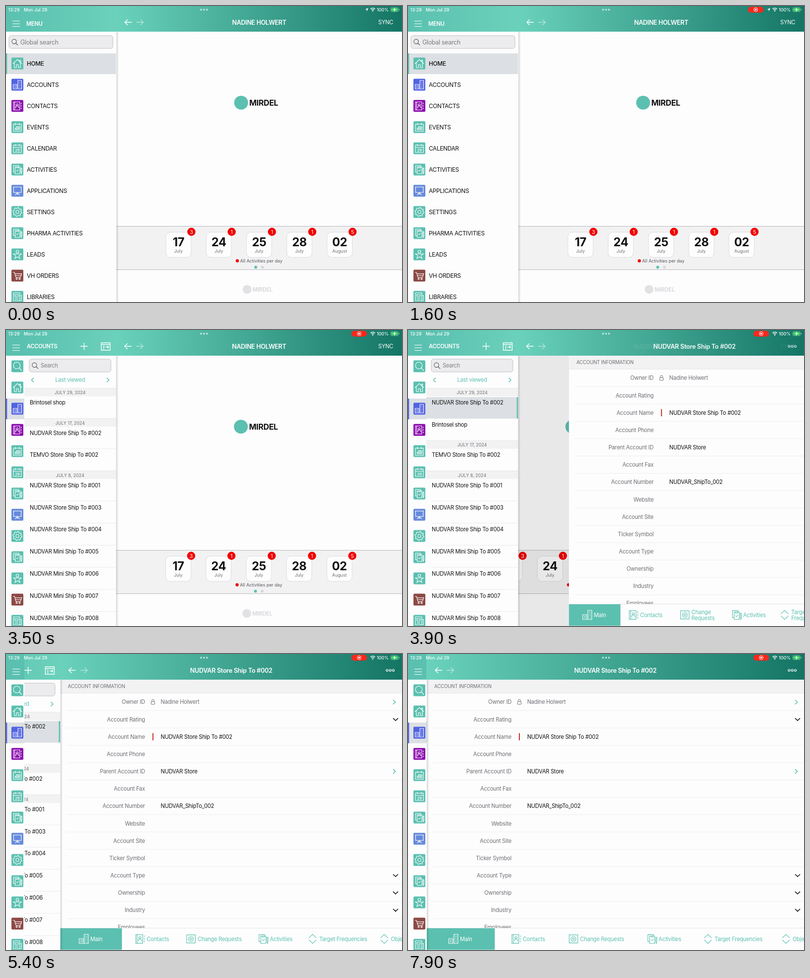
These frames come from a looping animation (800 px wide and 600 px high, 8 s). An HTML page:

```html
<!DOCTYPE html>
<html lang="en">
<head>
<meta charset="utf-8">
<title>Account browser</title>
<style>
html, body { margin: 0; width: 100%; height: 100%; overflow: hidden; background: #fdfdfe; }
svg { display: block; width: 800px; height: 600px; font-family: Inter, Roboto, sans-serif; }
text { white-space: pre; }
</style>
</head>
<body>
<svg id="stage" viewBox="0 0 800 600">
  <defs>
    <linearGradient id="side"><stop stop-color="#5bc1b0"/><stop offset="1" stop-color="#6bd1bb"/></linearGradient>
    <linearGradient id="bar"><stop stop-color="#6ad2bc"/><stop offset="1" stop-color="#147565"/></linearGradient>
    <linearGradient id="shade"><stop stop-color="#000" stop-opacity=".16"/><stop offset="1" stop-color="#000" stop-opacity="0"/></linearGradient>
  </defs>
  <g id="scene"></g>
</svg>
<script>
const LOOP = 8000, TEAL = '#5bc0b0', PAPER = '#fdfdfe', BAND = '#f2f2f3', PICKED = '#dcdfe3', GREY = '#6f6f74';
const STRIP = 38, SIDE = 223;

const clamp = v => Math.max(0, Math.min(1, v));
const ease = v => { v = clamp(v); return v * v * (3 - 2 * v); };
const rect = (x, y, w, h, fill, extra = '') =>
  `<rect x="${x}" y="${y}" width="${w}" height="${h}" fill="${fill}" ${extra}/>`;
const dot = (x, y, r, fill, extra = '') => `<circle cx="${x}" cy="${y}" r="${r}" fill="${fill}" ${extra}/>`;
const line = (d, color, width = 1.2, extra = '') =>
  `<path d="${d}" fill="none" stroke="${color}" stroke-width="${width}" ${extra}/>`;
const move = (x, y, body, extra = '') => `<g transform="translate(${x} ${y})" ${extra}>${body}</g>`;
// y is the vertical middle of the capitals
function text(x, y, s, { size = 11.1, fill = '#111', weight = 400, anchor = 'start', track = -.02, opacity = 1 } = {}) {
  return `<text x="${x}" y="${y + size * .36}" font-size="${size}" font-weight="${weight}" fill="${fill}"
    text-anchor="${anchor}" letter-spacing="${track * size}" opacity="${opacity}">${s}</text>`;
}

const gear = (outer, inner) => 'M' + Array.from({ length: 32 }, (_, i) => {
  const r = i % 4 < 2 ? outer : inner, a = (i + .5) * Math.PI / 16;
  return `${(12 + r * Math.cos(a)).toFixed(2)} ${(12 + r * Math.sin(a)).toFixed(2)}`;
}).join('L') + 'z';
const ring = (x, y, r) => `M${x - r} ${y}a${r} ${r} 0 1 0 ${2 * r} 0a${r} ${r} 0 1 0 ${-2 * r} 0`;

// Line icons on a 24 unit square
const ICONS = {
  search: ring(10.8, 10.5, 6.8) + 'M15.7 15.5L21 21',
  home: 'M3 12.5L12 4L21 12.5M5.8 10.5V20.5H10V14.5H14V20.5H18.2V10.5M16.3 8V5.2H18.5V10',
  accounts: 'M3.5 11.5H11V20.5H3.5zM13 3.5H20.5V20.5H13zM5.5 14.5h3.6M5.5 17.5h3.6M15 7h1.2M17.4 7h1.2M15 10.5h1.2M17.4 10.5h1.2M15 14h1.2M17.4 14h1.2M15 17.5h1.2M17.4 17.5h1.2',
  contacts: 'M4 4H16.8V20.2H4zM6.5 4V20.2' + ring(11.7, 9.8, 2) + 'M8.7 16.5V15a3 3 0 0 1 6 0V16.5M19.8 5.5v3M19.8 10.5v3M19.8 15.5v3',
  events: 'M4 6H20V20.5H4zM8 3.5v4.5M16 3.5v4.5M7.5 17.5h9.5V11H10V17.5M7.5 17.5V14.2H17M13.5 11V17.5',
  calendar: 'M4 5.5H20V20.5H4zM4 10H20M8 3.5v4M16 3.5v4',
  activities: 'M7.5 6.5H17V20.5H7.5zM7.5 17H4.2V3.8H14.5V6.5M10 6.5v2h4.5v-2M10 13.5l1.8 1.8 3-3.3M19 9h2v9l-1 2.5-1-2.5z',
  applications: 'M3 4.5H21M4.3 4.5V15.5H19.7V4.5M12 15.5V20.5M12 16L7.5 20.5M12 16L16.5 20.5',
  settings: gear(9.2, 7.2) + ring(12, 12, 3.2),
  leads: ring(12, 6.5, 2.7) + 'M4 11h16l-4.7 3.6 1.8 5.7L12 17l-5.1 3.3 1.8-5.7z',
  orders: 'M3 5.5H6.2L9 15.5H18L20.8 8H7' + ring(10.5, 18.5, 1.4) + ring(16.5, 18.5, 1.4) + 'M8 11.5H19',
  libraries: 'M4 4H16.8V20H4zM16.8 9H20V20H16.8M6.8 7.5h7v3.5h-7zM6.8 14h7M6.8 17h7',
  change: 'M4 4.5H20V19.5H4zM6.5 7v.1M17.5 7v.1M6.5 17v.1M17.5 17v.1' + ring(12, 12, 1.8) + ring(12, 12, 4.6),
  sort: 'M5 10.2L12 3.5L19 10.2M5 13.8L12 20.5L19 13.8'
};
const icon = (name, x, y, size, color) =>
  `<g transform="translate(${x} ${y}) scale(${size / 24})">${line(ICONS[name], color, 1.1 * 24 / size)}</g>`;
const tile = (name, y, color) => rect(11, y - 12, 24, 24, color, 'rx="2"') + icon(name, 11, y - 12, 24, '#fff') +
  (name === 'calendar' ? text(23, y + 3.4, '29', { size: 8, fill: '#fff', weight: 500, anchor: 'middle' }) : '');

const MENU = [
  ['HOME', 'home', TEAL], ['ACCOUNTS', 'accounts', '#5063e2'], ['CONTACTS', 'contacts', '#8b0cae'],
  ['EVENTS', 'events', TEAL], ['CALENDAR', 'calendar', TEAL], ['ACTIVITIES', 'activities', TEAL],
  ['APPLICATIONS', 'applications', '#668adb'], ['SETTINGS', 'settings', TEAL],
  ['PHARMA ACTIVITIES', 'activities', TEAL], ['LEADS', 'leads', TEAL],
  ['VH ORDERS', 'orders', '#8c4945'], ['LIBRARIES', 'libraries', TEAL]
];
const rowY = i => 116.5 + 43 * i;
const pickedRow = (i, w) => rect(0, rowY(i) - 20.5, w, 42, PICKED) + rect(0, rowY(i) - 20.5, 2.2, 42, MENU[i][2]);
const hamburger = line('M13 30.5H28M13 36H28M13 41.5H28', '#fff', 1.1);
const tiles = MENU.map(([, name, color], i) => tile(name, rowY(i), color)).join('');

function searchField(x, y, w, label, size) {
  return rect(x, y, w, 26, '#ececee', 'rx="4.5" stroke="#c0c0c4"') +
    line(ring(x + 10.5, y + 12, 4.6) + `M${x + 14} ${y + 15.5}l4 4`, '#55555a', 1.1) +
    text(x + 23, y + 13, label, { size, fill: '#7d7d83', track: -.03 });
}

function menu(picked) {
  return rect(0, 0, SIDE, 600, PAPER) + rect(0, 0, SIDE, 52, 'url(#side)') + pickedRow(picked, 222) +
    text(41, 36, 'MENU', { fill: '#fff', weight: 600 }) +
    MENU.map(([label], i) => text(42, rowY(i), label,
      { size: 11.85, track: -.028, weight: i === picked ? 500 : 400 })).join('');
}

const SHOP = 'Brintosel shop', NAMED = 'NUDVAR Store Ship To #002', SECOND = 'TEMVO Store Ship To #002';
const JULY_8 = ['Store Ship To #001', 'Store Ship To #003', 'Store Ship To #004', 'Mini Ship To #005',
  'Mini Ship To #006', 'Mini Ship To #007', 'Mini Ship To #008'].map(s => 'NUDVAR ' + s);

function panel(reordered, highlight) {
  const sections = [
    ['JULY 29, 2024', reordered ? [NAMED, SHOP] : [SHOP]],
    ['JULY 17, 2024', reordered ? [SECOND] : [NAMED, SECOND]],
    ['JULY 8, 2024', JULY_8]
  ];
  let y = 118;
  let out = rect(37, 0, 186, 600, PAPER) + rect(37, 0, 186, 52, 'url(#side)') +
    text(42, 33.5, 'ACCOUNTS', { fill: '#fff', weight: 600 }) +
    line('M150.5 33H165M157.7 26V40.5', '#fff', 1.4) +
    line('M192.5 26H210.5V41H192.5zM192.5 29.5H210.5M197.5 31.5V39M201 34.5H207.5M205 32L207.5 34.5L205 37', '#fff', 1.4) +
    searchField(47, 59, 165, 'Search', 11.1) +
    line('M56 97L51.5 101.5L56 106M203.5 97L208 101.5L203.5 106', TEAL, 1.5) +
    text(129.5, 101, 'Last viewed', { fill: TEAL, anchor: 'middle' });
  for (const [date, names] of sections) {
    out += rect(37, y, 186, 16.5, BAND) + line(`M37 ${y}H223`, '#e4e4e6', .8) +
      text(129.5, y + 9, date, { size: 8.9, fill: GREY, anchor: 'middle', track: 0 });
    y += 16.5;
    names.forEach((name, i) => {
      if (highlight && name === NAMED) out += rect(37, y + 1.5, 186, 43.5, PICKED) + rect(219.7, y + 1.5, 2.6, 43.5, TEAL);
      out += text(48, y + 12.9, name);
      y += 44.8;
      if (i < names.length - 1) out += line(`M48 ${y}H223`, '#e6e6e8', .8);
    });
  }
  return out;
}

const CARDS = [['17', 'July', 3], ['24', 'July', 1], ['25', 'July', 1], ['28', 'July', 1], ['02', 'August', 5]];
const home = rect(0, 52, 1000, 548, PAPER) +
  dot(475, 196, 14, TEAL) + text(491.5, 196, 'MIRDEL', { size: 16, weight: 700 }) +
  rect(0, 446, 1000, 89, BAND) + line('M0 446.5H1000M0 534.5H1000', '#b9b9bc', 1) +
  CARDS.map(([day, month, count], i) => {
    const x = 348.5 + 81.4 * i;
    return rect(x - 25.5, 458.5, 51, 51, PAPER, 'rx="9" stroke="#dcdce0"') +
      text(x, 478.5, day, { size: 23.7, weight: 700, anchor: 'middle' }) +
      text(x, 497, month, { size: 8.9, fill: GREY, anchor: 'middle', track: 0 }) +
      dot(x + 26, 457.7, 8.2, '#f00000') +
      text(x + 26, 457.7, count, { size: 10.8, fill: '#fff', anchor: 'middle' });
  }).join('') +
  dot(467.3, 516.5, 3.2, '#f00000') + text(473, 516.5, 'All Activities per day', { size: 8.9, fill: '#58585c', track: 0 }) +
  dot(504.5, 529.5, 2.9, TEAL) + dot(518, 529.5, 2.9, '#d6d6d9') +
  dot(487, 574.5, 9, '#e2e2e5') + text(498, 574.5, 'MIRDEL', { size: 11.2, weight: 700, fill: '#dadadd' });

// label, value, control at the right
const FIELDS = [
  ['Owner ID', 'Nadine Holwert', 'go'], ['Account Rating', '', 'drop'], ['Account Name', NAMED],
  ['Account Phone'], ['Parent Account ID', 'NUDVAR Store', 'go'], ['Account Fax'],
  ['Account Number', 'NUDVAR_ShipTo_002'], ['Website'], ['Account Site'], ['Ticker Symbol'],
  ['Account Type', '', 'drop'], ['Ownership', '', 'drop'], ['Industry', '', 'drop'], ['Employees']
];
// label, icon, content width on one line, content width on two lines
const TABS = [
  ['Main', 'accounts', 48], ['Contacts', 'contacts', 69], ['Change Requests', 'change', 112, 70],
  ['Activities', 'activities', 69], ['Target Frequencies', 'sort', 118, 83], ['Objectives', 'sort', 77]
];

function tabBar(left) {
  const width = (800 - left) / 5.55, narrow = width < 122;
  return rect(left, 555, 800, 45, PAPER) + line(`M${left} 555.5H1400`, '#e2e2e4', 1) +
    TABS.map(([label, name, wide, slim], i) => {
      const color = i ? TEAL : '#fff', wraps = narrow && slim;
      const x = left + width * (i + .5) - (wraps ? slim : wide) / 2, tx = x + 22.3;
      const lines = wraps ? label.split(' ') : [label];
      return (i ? '' : rect(left, 556, width, 43.5, TEAL)) + icon(name, x - 4, 564.5, 26, color) +
        lines.map((s, k) => text(tx, 578 + (k - (lines.length - 1) / 2) * 12.6, s, { fill: color })).join('');
    }).join('');
}

function detail(left) {
  const rows = FIELDS.map(([label, value, control], i) => {
    const y = 97.5 + 35.15 * i;
    return text(left + 171, y, label, { fill: GREY, anchor: 'end' }) +
      (value ? text(left + 202.7, y, value, { fill: i ? '#111' : GREY }) : '') +
      line(`M${left + 12} ${y + 17.3}H${1400}`, '#ececee', .9) +
      (control === 'go' ? line(`M782 ${y - 4.5}l4.6 4.5l-4.6 4.5`, TEAL, 1.5) : '') +
      (control === 'drop' ? line(`M782 ${y - 2.5}l5 4.8l5 -4.8`, '#111', 1.5) : '');
  }).join('');
  const x = left + 187;
  return rect(left, 52, 800, 548, PAPER) + rect(left, 52, 800, 27, BAND) + line(`M${left} 79.3H1400`, '#e2e2e4', .9) +
    text(left + 15, 66, 'ACCOUNT INFORMATION', { size: 9.63, fill: GREY, track: -.012 }) + rows +
    rect(x - 3.7, 96.5, 7.4, 5.5, 'none', `rx="1" stroke="${GREY}"`) +
    line(`M${x - 2.3} 96.5v-2a2.3 2.3 0 0 1 4.6 0v2`, GREY, 1) +
    rect(x - 1, 160.5, 2, 14.5, '#c92f2f') + tabBar(left);
}

function header(left, push) {
  const middle = (left + 800) / 2, title = { size: 12.6, fill: '#fff', weight: 600, anchor: 'middle' };
  const leaving = (1 - push) ** 1.4;
  return rect(left, 0, 800 - left, 52, 'url(#bar)') +
    line(`M${left + 31} 33H${left + 17}M${left + 23} 27.3L${left + 17} 33L${left + 23} 38.7`, '#fff', 1.4) +
    line(`M${left + 40} 33H${left + 54}M${left + 48.5} 27.3L${left + 54.5} 33L${left + 48.5} 38.7`, '#fff', 1.4, 'opacity=".5"') +
    text(middle, 33.5, 'NADINE HOLWERT', { ...title, track: -.03, opacity: leaving }) +
    text(752, 33.5, 'SYNC', { fill: '#fff', opacity: leaving }) +
    (push ? text(middle + 380 * (1 - push), 33.5, NAMED, { ...title, opacity: clamp(push * 1.15) }) +
      [770, 776.3, 782.5].map(x => dot(x, 33, 2, 'none', `stroke="#fff" stroke-width="1.2" opacity="${push}"`)).join('') : '');
}

function statusBar(recording, locating) {
  const style = { size: 8.9, fill: '#fff', weight: 500, track: 0 }, x = locating ? 702.5 : 713.5;
  return text(4.5, 7.5, '13:29', style) + text(36, 7.5, 'Mon Jul 29', style) +
    [394, 400, 406].map(cx => dot(cx, 7.5, 2, '#fff', 'opacity=".6"')).join('') +
    (recording ? rect(x - 15.7, 1.5, 31.4, 12, '#f8281e', 'rx="6"') + dot(x, 7.5, 1.8, '#fff') +
      dot(x, 7.5, 3.9, 'none', 'stroke="#fff"') : '') +
    (locating ? '<path d="M732 3.8L725.3 7.2L728.6 7.6L729 11z" fill="#fff"/>' : '') +
    line('M736.3 6.1a6.7 6.7 0 0 1 9.4 0M738.2 8.1a4 4 0 0 1 5.6 0', '#fff', 1.4) + dot(741, 10, 1.2, '#fff') +
    text(749, 7.5, '100%', style) +
    rect(777, 3, 16, 8.6, 'none', 'rx="2.8" stroke="#fff" stroke-opacity=".5" stroke-width=".8"') +
    rect(778.2, 4.2, 13.6, 6.2, '#3fdb62', 'rx="1.6"') + rect(794, 5.8, 1.2, 3, '#fff', 'rx=".6" opacity=".5"') +
    '<path d="M786.3 2.6L782 7.8H784.8L783.6 12.2L788 6.8H785.2z" fill="#fff"/>';
}

function scene(t) {
  const opened = t >= 2000, open = ease((t - 2000) / 350), fold = ease((t - 5200) / 350);
  const push = 1 - (1 - clamp((t - 3700) / 500)) ** 3.36;
  const left = SIDE - (SIDE - STRIP) * fold - (opened ? .5 * (1 - fold) : 0);
  const width = 800 - left, picked = opened ? 1 : 0;

  let out = menu(picked);
  if (opened) out += move((STRIP - SIDE) * (1 - open + fold), 0, panel(t >= 3700, t >= 3600));
  if (push < 1) out += `<svg x="${left}" width="${width}" height="600">` +
    move(-SIDE - .3 * width * push, 0, home) + rect(0, 52, width, 548, '#000', `opacity="${.1 * push}"`) + '</svg>';
  if (push > 0) out += move(width * (1 - push), 0, detail(left));
  out += header(left, push) + rect(left, 52, 5, 548, 'url(#shade)');
  if (opened) out += rect(0, 0, 37, 600, PAPER) + rect(0, 0, 37, 52, TEAL) + pickedRow(1, 37) + tile('search', 73.5, TEAL);
  else out += searchField(6, 60, 210, 'Global search', 12.6);
  return out + tiles + hamburger + statusBar(t >= 800, t < 2300);
}

const layer = document.getElementById('scene');
let shown = '';
function frame() {
  const next = scene(performance.now() % LOOP);
  if (next !== shown) layer.innerHTML = shown = next;
  requestAnimationFrame(frame);
}
frame();
</script>
</body>
</html>
```
